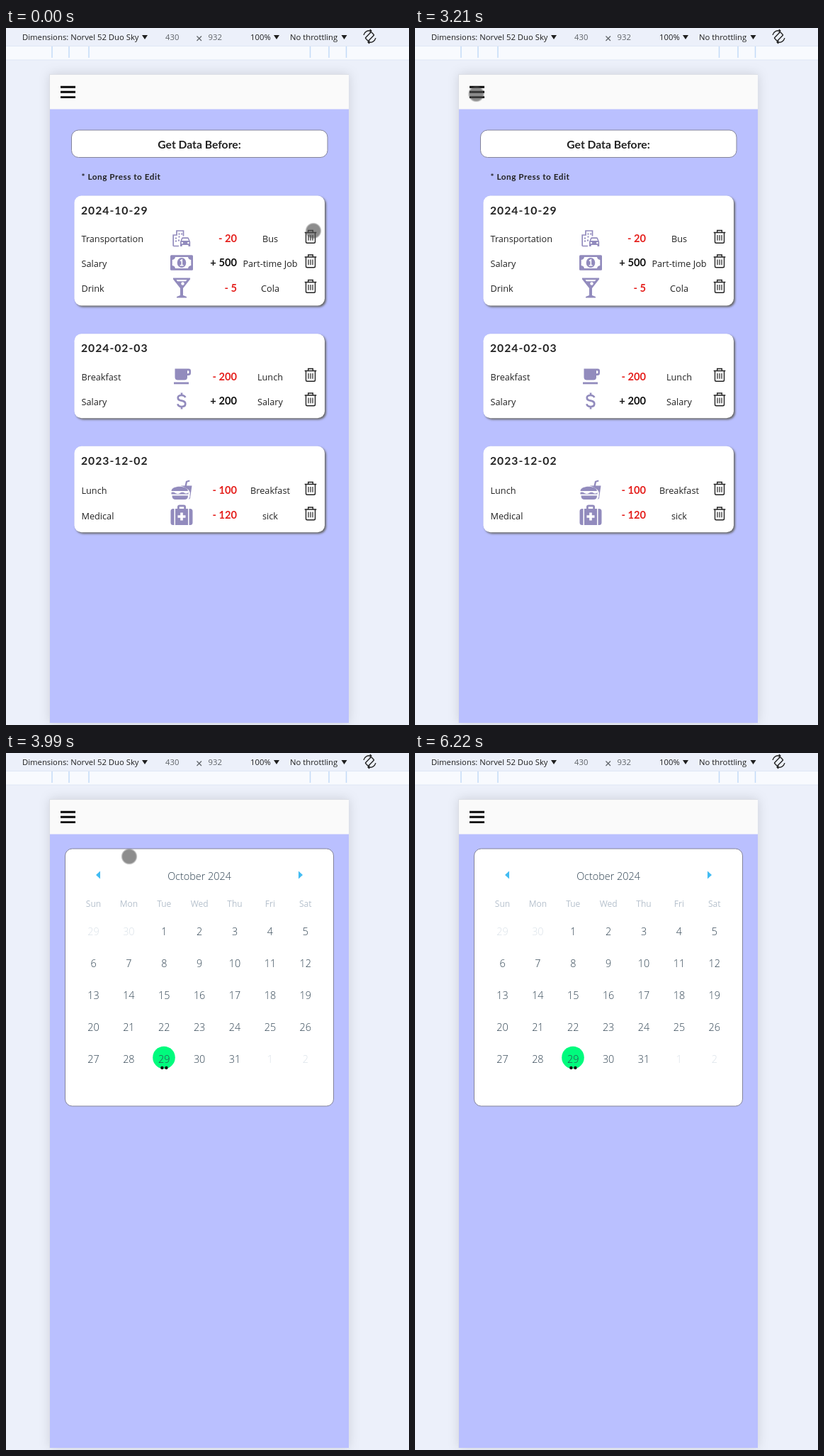
An HTML page for the animation above (6.63 s loop, 569 by 983 pixels).

```html
<!DOCTYPE html>
<html lang="en">
<head>
<meta charset="utf-8">
<title>Expense tracker walkthrough</title>
<style>
  html, body { margin: 0; width: 100%; height: 100%; overflow: hidden; background: #ecf0fa; }
  svg { display: block; width: 569px; height: 983px; }
  text { font-family: "Open Sans", sans-serif; font-size: 12.7px; fill: #222; white-space: pre; }
  .bar { font-size: 11.3px; fill: #1f1f1f; }
  .dim { fill: #5f6368; }
  .head, .date, .note, .sum, .item { font-family: Lato, sans-serif; font-weight: 700; }
  .head { font-size: 15.7px; }
  .item { font-size: 15.7px; fill: #7e7e80; }
  .date { font-size: 15.7px; letter-spacing: 1px; }
  .note { font-size: 11.8px; letter-spacing: .5px; }
  .sum { font-size: 14.7px; fill: #111; }
  .minus { fill: #e5201d; }
  .month, .day { font-size: 14.4px; font-weight: 300; fill: #2d4150; }
  .week { font-size: 12px; fill: #b6c1cd; }
  .off { fill: #d9e1e8; }
  .card { fill: #fff; filter: drop-shadow(2px 2px 1.5px #666); }
  .box { fill: #fff; stroke: #85859a; }
  .button { filter: drop-shadow(2px 2px 1.5px #777); }
  .icon { fill: #928bbd; }
  .line { fill: none; stroke: #222; stroke-width: 1.4; }
</style>
</head>
<body>
<svg viewBox="0 0 569 983">
  <defs>
    <clipPath id="screen"><rect x="62" y="114.5" width="422" height="865.5"/></clipPath>
    <radialGradient id="touch">
      <stop offset=".8" stop-color="#505050" stop-opacity=".65"/>
      <stop offset=".9" stop-color="#505050" stop-opacity=".4"/>
      <stop offset="1" stop-color="#505050" stop-opacity=".08"/>
    </radialGradient>
    <radialGradient id="press">
      <stop offset=".76" stop-color="#b1af00" stop-opacity=".7"/>
      <stop offset=".88" stop-color="#e6e040" stop-opacity=".5"/>
      <stop offset="1" stop-color="#fff8a0" stop-opacity=".1"/>
    </radialGradient>

    <g id="trash" class="line">
      <path d="M-8.3-6H8.3M-3.3-6V-9H3.3V-6M-6.5-6V7Q-6.5 8.8-4.7 8.8H4.7Q6.5 8.8 6.5 7V-6"/>
      <path d="M-3-2.5V5.3M0-2.5V5.3M3-2.5V5.3" stroke-width="1.2"/>
    </g>
    <g id="transport" class="icon">
      <path d="M-11.8 11V-4.5H-7V-10.5H2.5V-3M-11.8 11H-4" fill="none" stroke="#928bbd" stroke-width="1.7"/>
      <path d="M-4.5-7h2v2h-2zM-.8-7h2v2h-2zM-4.5-3h2v2h-2zM-9-1h2v2h-2zM-9 3h2v2h-2zM-5 2h2v2h-2z"/>
      <path fill-rule="evenodd" d="M-2 5 0-.2Q.4-1.2 1.5-1.2H8.5Q9.600-1.2 10 -.2L12.200 5V11.500H9.500V9.500H.7V11.500H-2ZM.2 3.500H10L8.600.5H1.500ZM.8 5.200a1.300 1.300 0 1 0 .01 0M9.400 5.200a1.300 1.300 0 1 0 .01 0"/>
    </g>
    <g id="cash" class="icon">
      <rect x="-16" y="-10.700" width="32" height="21.500" rx="1.500"/>
      <path fill="#fff" d="M-9-8H9Q9.500-4.500 13.300-4V4Q9.500 4.500 9 8H-9Q-9.500 4.500-13.300 4V-4Q-9.500-4.500-9-8"/>
      <ellipse rx="6.300" ry="7"/>
      <path d="M-2-2.500 .3-4V3.600M-2.300 3.700H2.600" fill="none" stroke="#fff" stroke-width="1.600"/>
    </g>
    <g id="drink" class="icon">
      <path d="M-12-14H12Q12.500-12.500 11.500-11.400L2 .5V10.500L7 12.500V14H-7V12.500L-2 10.500V.5L-11.500-11.400Q-12.500-12.500-12-14"/>
      <path d="M-7.500-11.500H7.500L5.800-9.300H-5.800Z" fill="#fff"/>
      <circle cx="1.500" cy="-6" r="2.200" fill="#fff"/>
    </g>
    <g id="coffee" class="icon">
      <path fill-rule="evenodd" d="M-9.500-11H10Q13-11 13-8V-5Q13-1.500 9.500-1.500H8V1Q8 5 4 5H-5.500Q-9.500 5-9.500 1ZM8-8.300V-4.200H9Q10.400-4.200 10.400-5.500V-7.200Q10.400-8.300 9-8.300Z"/>
      <rect x="-11" y="8" width="21" height="2.800"/>
    </g>
    <g id="money" fill="none" stroke="#928bbd" stroke-width="2.700">
      <path d="M5.300-5Q4-8 0-8C-7-8-7-1.500 0-.3C7.500 1 6.500 8 0 8Q-4.800 8-5.600 4.300M0-11.500V-8M0 8V11.500"/>
    </g>
    <g id="lunch" class="icon">
      <path d="M-1.500-6H4.500L6-12.500 11-14 11.500-12 8-11 7-6H14.500L12 11.500Q11.500 13 9.500 13 12 11 11.500 7 14-1-1.500-6"/>
      <path d="M-14.500 1.500C-14.500-7 8.500-7 9 1.500ZM-14.500 3.500Q-11.500 2-8.500 4.500-5.500 6.500-2.500 4.500 1 2 4.500 4.500 7 6 9.500 3.500V6H-14.500ZM-13.500 8H9Q9 13.500 4 13.500H-8.500Q-13.500 13.500-13.500 8"/>
    </g>
    <g id="medical" class="icon">
      <path d="M-15.500-5.500Q-15.500-9-12-9H-10.500V14H-12Q-15.500 14-15.500 10.500ZM15.500-5.500Q15.500-9 12-9H10.500V14H12Q15.500 14 15.500 10.500Z"/>
      <path fill-rule="evenodd" d="M-9-9H-6V-11.500Q-6-14.500-3-14.500H3Q6-14.500 6-11.500V-9H9V14H-9ZM-3.200-9H3.200V-11.800H-3.200Z"/>
      <path d="M0-3.500V7.500M-5.500 2H5.500" stroke="#fff" stroke-width="3.600"/>
    </g>
  </defs>

  <rect width="569" height="983" fill="#ecf0fa"/>
  <rect y="26" width="569" height="19" fill="#f8fafe"/>
  <path d="M0 25.500H569M0 45H569" stroke="#dfe7f5"/>
  <path d="M65 26V42M89 26V42M117 26V42M429.500 26V42M456 26V42M480.500 26V42" stroke="#c3dbf8" stroke-width="1.500"/>
  <path d="M192 10h8l-4 6zM378 10h8l-4 6zM473.500 10h8l-4 6z" fill="#1f1f1f"/>
  <path d="M269.500 11.500l6.500 6.500m0-6.500l-6.500 6.500" stroke="#5f6368" stroke-width="1.200"/>
  <g class="line" transform="translate(513.500 12) rotate(45)">
    <rect x="-3" y="-6" width="6" height="12" rx="1"/>
    <path d="M-7.500 4.500A8.200 8.200 0 0 1-4-7M-6.800-7.300H-4V-4.300M7.500-4.500A8.200 8.200 0 0 1 4 7M6.800 7.300H4V4.300"/>
  </g>
  <g id="toolbar"></g>

  <rect x="62" y="65" width="422" height="915" fill="#bac0ff" style="filter:drop-shadow(0 0 8px #0002)"/>
  <g clip-path="url(#screen)">
    <g id="list"></g>
    <g id="menu"><rect x="62" y="114" width="422" height="275.500" fill="#d4d8fc"/></g>
    <g id="calendar">
      <rect class="box" x="83.500" y="135" width="379" height="363" rx="10"/>
      <path d="M133 166.500v11l-6-5.500zM413 166.500v11l6-5.500z" fill="#42bcf3"/>
      <circle cx="223" cy="429.500" r="15.800" fill="#00fb7d"/>
    </g>
  </g>
  <rect x="62" y="65" width="422" height="49.500" fill="#fafafa"/>
  <path d="M61.500 980V65.500H484" fill="none" stroke="#dcdfe6"/>
  <path d="M77 83.300H98M77 90.300H98M77 97.600H98" stroke="#080808" stroke-width="2.900"/>
  <g id="cursor">
    <circle id="finger" r="11.500" fill="url(#touch)"/>
    <circle id="click" r="12" fill="url(#press)"/>
  </g>
</svg>
<script>
const LOOP = 6630, MENU_OPEN = 3330, PAGE_CHANGE = 3950;
const $ = id => document.getElementById(id);

function add(parent, tag, attrs, content = '') {
  const node = document.createElementNS('http://www.w3.org/2000/svg', tag);
  for (const key in attrs) node.setAttribute(key, attrs[key]);
  node.textContent = content;
  return parent.appendChild(node);
}
const label = (parent, kind, x, y, content, anchor = 'start') =>
  add(parent, 'text', { class: kind, x, y, 'text-anchor': anchor }, content);
const box = (parent, kind, x, y, width, height) =>
  add(parent, 'rect', { class: kind, x, y, width, height, rx: 10 });
const symbol = (parent, name, x, y) =>
  add(parent, 'use', { href: '#' + name, x, y });

// Toolbar
[['', 23, 'Dimensions: Norvel 52 Duo Sky'], ['dim', 225, '430'], ['dim', 285.5, '932'],
 ['', 345, '100%'], ['', 401, 'No throttling']]
  .forEach(([kind, x, content]) => label($('toolbar'), 'bar ' + kind, x, 17, content));

// Record list
const list = $('list');
box(list, 'box', 92.5, 144, 361.5, 38.5);
label(list, 'head', 273, 169.5, 'Get Data Before:', 'middle');
label(list, 'note', 106.5, 214, '* Long Press to Edit');

const cards = [
  { y: 236.5, height: 155, date: '2024-10-29', rows: [
    [301.5, 'Transportation', 'transport', '- 20', 'Bus'],
    [336, 'Salary', 'cash', '+ 500', 'Part-time Job'],
    [371.5, 'Drink', 'drink', '- 5', 'Cola']] },
  { y: 431.2, height: 119, date: '2024-02-03', rows: [
    [496.5, 'Breakfast', 'coffee', '- 200', 'Lunch'],
    [531, 'Salary', 'money', '+ 200', 'Salary']] },
  { y: 589.8, height: 121.5, date: '2023-12-02', rows: [
    [656.5, 'Lunch', 'lunch', '- 100', 'Breakfast'],
    [692, 'Medical', 'medical', '- 120', 'sick']] }
];
for (const { y, height, date, rows } of cards) {
  box(list, 'card', 96.5, y, 353.5, height);
  label(list, 'date', 106, y + 26.2, date);
  for (const [base, name, icon, sum, memo] of rows) {
    label(list, '', 106.5, base + .5, name);
    symbol(list, icon, 248, base - 5);
    label(list, sum[0] === '-' ? 'sum minus' : 'sum', 326, base, sum, 'end');
    label(list, '', 373, base + .5, memo, 'middle');
    symbol(list, 'trash', 430, base - 7);
  }
}

// Menu
['Input', 'Edit Category', 'Record List', 'Add Schedule', 'Chart'].forEach((name, i) => {
  const y = 135 + 49.05 * i;
  box($('menu'), 'box button', 82, y, 382.5, 38.5);
  label($('menu'), 'item', 273, y + 24.5, name, 'middle');
});

// Calendar
const calendar = $('calendar');
const column = i => 123.5 + 49.88 * i;
label(calendar, 'month', 273, 178.7, 'October 2024', 'middle');
['Sun', 'Mon', 'Tue', 'Wed', 'Thu', 'Fri', 'Sat'].forEach((name, i) =>
  label(calendar, 'week', column(i), 216.7, name, 'middle'));
for (let i = 0; i < 35; i++) {
  const day = i - 1;
  const inMonth = day > 0 && day < 32;
  const shown = inMonth ? day : day < 1 ? day + 30 : day - 31;
  label(calendar, inMonth ? 'day' : 'day off', column(i % 7),
    256.7 + 45.1 * Math.floor(i / 7), shown, 'middle');
}
for (const cx of [220.4, 226.4]) add(calendar, 'circle', { cx, cy: 444, r: 2.2, fill: '#111' });

// Motion
function play(node, frames) {
  const last = frames[frames.length - 1];
  node.animate([...frames, { ...last, offset: 1 }], { duration: LOOP, iterations: Infinity });
}
const switches = (node, property, steps) => play(node, steps.map(([time, value]) =>
  ({ offset: time / LOOP, [property]: value, easing: 'step-end' })));

const path = [
  [0, 434, 286], [50, 433, 286], [170, 428, 287], [420, 428, 287], [770, 422, 331],
  [890, 422, 331], [1220, 421, 363], [1400, 421, 363], [1700, 270, 318], [1950, 117, 239],
  [2100, 130, 270], [2230, 200, 291], [2330, 233, 275], [2440, 206, 245], [2780, 101, 99],
  [2850, 87, 95], [3130, 86.5, 93], [3390, 86.5, 93], [3770, 174, 146], [4000, 174, 146],
  [4470, 247, 378], [4710, 230.5, 444], [4800, 230.5, 444], [5000, 212, 440], [5170, 225, 446],
  [5400, 240, 440], [5600, 212, 453], [5800, 220, 436], [5940, 400, 702], [6100, 473, 890],
  [6160, 523, 958]
];
play($('cursor'), path.map(([time, x, y]) =>
  ({ offset: time / LOOP, transform: `translate(${x}px, ${y}px)` })));
switches($('cursor'), 'opacity', [[0, 1], [5840, 0], [5940, 1], [6160, 0]]);

const presses = [[0, 0], [3270, 1], [MENU_OPEN, 0], [3770, 1], [PAGE_CHANGE, 0]];
switches($('click'), 'opacity', presses);
switches($('finger'), 'opacity', presses.map(([time, on]) => [time, 1 - on]));

switches(list, 'transform', [[0, 'translate(0px, 0px)'], [MENU_OPEN, 'translate(0px, 274.8px)']]);
switches(list, 'opacity', [[0, 1], [PAGE_CHANGE, 0]]);
switches($('menu'), 'opacity', [[0, 0], [MENU_OPEN, 1], [PAGE_CHANGE, 0]]);
switches(calendar, 'opacity', [[0, 0], [PAGE_CHANGE, 1]]);
</script>
</body>
</html>
```
